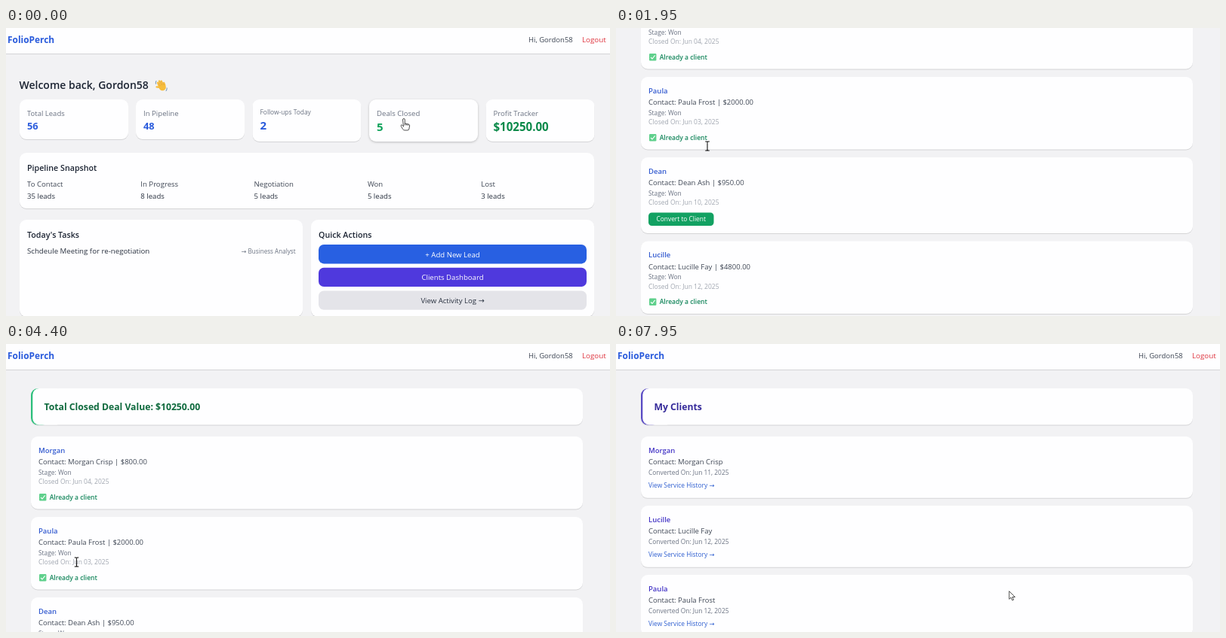
Animation, 800 px wide and 383 px high, one loop 8000 ms. Source, as an HTML page:

```html
<!DOCTYPE html>
<html lang="en">
<head>
<meta charset="utf-8">
<title>CRM dashboard</title>
<style>
  html, body { margin: 0; width: 100%; height: 100%; overflow: hidden; background: #f2f2f4; }
  svg { display: block; width: 100%; height: 100%; font-family: "Open Sans", "Noto Sans", sans-serif; }
  .card { fill: #fefeff; filter: drop-shadow(0 1px .5px rgba(0, 0, 0, .12)); }
  .card.lift { filter: drop-shadow(0 1.8px 1.6px rgba(0, 0, 0, .22)); }
  .arrow { font-family: "DejaVu Sans", sans-serif; }
</style>
</head>
<body>
<svg id="stage" viewBox="0 0 800 383"></svg>
<script>
const INK = '#1c2433', BODY = '#3e4654', DARK = '#2a3240', GRAY = '#6a7282', PALE = '#a0a6b0';
const BLUE = '#2a5bdc', GREEN = '#0b8a4a';
const USER = 'Gordon58';

const text = (x, y, s, size, fill, weight = 400, anchor = 'start') =>
  `<text x="${x}" y="${y}" font-size="${size}" fill="${fill}" font-weight="${weight}" text-anchor="${anchor}">` +
  `${s.replace('→', '<tspan class="arrow">→</tspan>')}</text>`;
const rect = (x, y, w, h, r, attrs) =>
  `<rect x="${x}" y="${y}" width="${w}" height="${h}" rx="${r}" ${attrs}/>`;
const card = (x, y, w, h, attrs = '') => rect(x, y, w, h, 9, `class="card" ${attrs}`);

const header =
  rect(-5, -5, 810, 39, 0, 'class="card"') +
  text(2, 20, 'FolioPerch', 11.9, BLUE, 700) +
  text(692, 19.3, 'Hi, ' + USER, 9.5, BODY) +
  text(763, 19.3, 'Logout', 9.8, '#df3640');

const wave = `<g transform="translate(205.5 77) rotate(-22)" fill="none" stroke="#f6bd3d" stroke-linecap="round">
  <path d="M-2.6 0v-5.6M.1 0v-7M2.7 0v-5.8M-1 2-6-1" stroke-width="2.3"/>
  <path d="M5 1v-3.6" stroke-width="2"/>
  <ellipse cx="1" cy="2.2" rx="4.6" ry="4.6" fill="#f6bd3d" stroke="none"/>
  <path d="M-1.3-1v-4M1.4-1v-5M3.9 0v-3" stroke="#d98e2b" stroke-width=".5"/>
  <path d="M-5.6-5.2q.5-2.2 2-3.2M6 5.5q-.6 2-2.4 3" stroke="#6f93b5" stroke-width="1"/>
</g>`;

// x, height, label, label size, label baseline, value, value size, value baseline, colour
const stats = [
  [18, 53, 'Total Leads', 9.5, 117, '56', 12.8, 134.5, BLUE],
  [172, 53, 'In Pipeline', 9.6, 117, '48', 12.8, 134.5, BLUE],
  [326.5, 56, 'Follow-ups Today', 8.4, 115, '2', 15, 134.5, BLUE],
  [481, 56, 'Deals Closed', 9.6, 117, '5', 15, 136.8, '#10a35c'],
  [635.5, 56, 'Profit Tracker', 9.6, 117, '$10250.00', 15.1, 136.8, GREEN]
].map(([x, h, label, ls, ly, value, vs, vy, color], i) =>
  card(x, 95, 144, h, `id="stat${i}"`) +
  text(x + 10, ly, label, ls, GRAY) +
  text(x + 10, vy, value, vs, color, 700)).join('');

const stages = [['To Contact', 35], ['In Progress', 8], ['Negotiation', 5], ['Won', 5], ['Lost', 3]]
  .map(([name, n], i) =>
    text(28 + i * 150.3, 211, name, 9.6, BODY) +
    text(28 + i * 150.3, 226.5, n + ' leads', 9.6, DARK)).join('');

const buttons = [
  { y: 288, label: '+ Add New Lead', color: '#fff', fill: '#2860e2', hover: '#2150c4' },
  { y: 318.7, label: 'Clients Dashboard', color: '#fff', fill: '#4f39dd', hover: '#432fc6' },
  { y: 349.4, label: 'View Activity Log →', color: DARK, fill: '#e4e4e9', hover: '#d3d5db' }
];
const buttonMarkup = buttons.map((b, i) =>
  rect(414, b.y, 355, 25.4, 7, `id="button${i}" fill="${b.fill}"`) +
  text(591.5, b.y + 16.6, b.label, 9.6, b.color, 400, 'middle')).join('');

const dashboard = header +
  text(17.5, 81, `Welcome back, ${USER}`, 14, INK, 600) + wave + stats +
  card(18, 166, 761, 74) + text(28, 189.5, 'Pipeline Snapshot', 10.7, INK, 600) + stages +
  card(18, 255, 375, 129) + text(28, 278.5, "Today's Tasks", 10.7, INK, 600) +
  text(28, 300, 'Schdeule Meeting for re-negotiation', 9.7, DARK) +
  text(383.5, 299.7, '→ Business Analyst', 8.1, GRAY, 400, 'end') +
  card(404, 255, 375, 129) + text(414, 278.5, 'Quick Actions', 10.7, INK, 600) +
  buttonMarkup;

const banner = (title, edge, color) =>
  card(33, 59, 731, 48.6) +
  rect(33, 59, 24, 48.6, 9, `fill="${edge}"`) +
  rect(35.3, 59, 40, 48.6, 8.5, 'fill="#fefeff"') +
  text(50.5, 88.4, title, 12.2, color, 700);

const clientMark = y =>
  rect(44, y + 76, 9.4, 9.4, 1.2, 'fill="#5fd08c"') +
  `<path d="M46 ${y + 81}l2 2 3.6-4.6" fill="none" stroke="#fff" stroke-width="1.1"/>` +
  text(57.7, y + 83.6, 'Already a client', 8.5, '#12855a', 600);
const convertButton = y =>
  rect(43, y + 73.5, 86.5, 17.5, 4.5, 'id="convert" fill="#12a162"') +
  text(86.2, y + 85.4, 'Convert to Client', 8.4, '#fff', 400, 'middle');

const people = { Morgan: 'Crisp', Paula: 'Frost', Dean: 'Ash', Lucille: 'Fay' };

const deal = (y, name, value, day, isClient) =>
  card(33, y, 731, isClient ? 96.5 : 101) +
  text(43, y + 21.7, name, 9.5, '#355cd0', 600) +
  text(43, y + 37.2, `Contact: ${name} ${people[name]} | $${value}.00`, 9.5, BODY) +
  text(43, y + 50.7, 'Stage: Won', 8.4, GRAY) +
  text(43, y + 63.2, `Closed On: Jun ${day}, 2025`, 8.5, PALE) +
  (isClient ? clientMark(y) : convertButton(y));

const deals = header + banner('Total Closed Deal Value: $10250.00', '#2dbf7c', '#0f6a3e') +
  deal(123, 'Morgan', 800, '04', true) +
  deal(230, 'Paula', 2000, '03', true) +
  deal(337, 'Dean', 950, 10, false) +
  deal(448.5, 'Lucille', 4800, 12, true);

const client = (y, name, day) =>
  card(33, y, 731, 81.8) +
  text(43, y + 21.7, name, 9.5, '#4536c6', 600) +
  text(43, y + 37.2, `Contact: ${name} ${people[name]}`, 9.5, BODY) +
  text(43, y + 50.5, `Converted On: Jun ${day}, 2025`, 8.4, GRAY) +
  text(43, y + 68.4, 'View Service History →', 8.4, '#2f5fd0');

const clients = header + banner('My Clients', '#5a4cc4', '#352a9a') +
  client(123, 'Morgan', 11) + client(215, 'Lucille', 12) + client(307, 'Paula', 12);

const pointers = {
  arrow: '<path d="M0 0v10.6l2.4-2.2 1.7 3.8 1.8-.8-1.7-3.6h3.5z" fill="#fff" stroke="#222" stroke-width=".8"/>',
  hand: `<path d="M-1.5 1q0-1.5 1.4-1.5t1.4 1.5v5l5 1q1.5.4 1.3 2l-.7 4q-.3 2-2 2h-4q-1.5 0-2.3-1.5l-2.4-4q-.5-1.3.5-1.6t2 1.4l.8.8z
    M1.3 6v2.5M3.4 6.5v2M5.4 7v1.8" fill="#fff" stroke="#222" stroke-width=".8"/>`,
  beam: '<path d="M-2.8-6h2L0-5.3.8-6h2M0-5.3V5.3M-2.8 6h2L0 5.3.8 6h2" fill="none" stroke="#111" stroke-width="1.1"/>'
};

const pages = { dashboard, deals, clients };
const group = prefix => ([name, body]) => `<g id="${prefix}${name}">${body}</g>`;
const $ = id => document.getElementById(id);
$('stage').innerHTML =
  rect(0, 0, 800, 383, 0, 'fill="#f2f2f4"') +
  Object.entries(pages).map(group('page-')).join('') +
  `<g id="status">${rect(-5, 373, 84.5, 15, 1.5, 'fill="#2d2d31"')}` +
  '<text id="url" x="-1" y="381.8" font-size="8" fill="#f0f0f0"></text></g>' +
  `<g id="pointer">${Object.entries(pointers).map(group('pointer-')).join('')}</g>`;

const LOOP = 8000, STEP = 50;
const pageTimes = [[0, 'dashboard'], [500, 'deals'], [5700, 'dashboard'], [7750, 'clients']];
const pointerTimes = [
  [0, 'hand'], [550, 'arrow'], [1150, 'beam'], [2150, 'arrow'], [3300, 'hand'], [3650, 'arrow'],
  [4400, 'beam'], [4500, 'arrow'], [5250, 'hand'], [5750, 'arrow'], [6650, 'hand'], [7850, 'arrow']
];
const statusTimes = [
  [0, ''], [100, 'deals/closed/'], [500, ''], [3400, 'convert/3/'], [3700, ''],
  [5400, 'dashboard/'], [6100, ''], [6750, 'clients/'], [7100, 'activity/'], [7450, 'clients/'], [7750, '']
];
const path = [
  [0, 527, 121], [550, 527, 121], [850, 330, 150], [1250, 121, 157], [2150, 121, 157],
  [2550, 107.5, 234], [2900, 112, 150], [3000, 112, 152], [3350, 100, 310], [3600, 92, 316],
  [3750, 95, 355], [4350, 95, 355], [4400, 93.5, 290], [4700, 140, 150], [5100, 45, 24],
  [5300, 42, 16], [5800, 42, 16], [6000, 220, 80], [6050, 250, 111], [6550, 494.5, 314.5],
  [6900, 505, 328], [7200, 545, 354], [7550, 520.8, 328.7], [8000, 520.8, 328.7]
];
const scroll = [
  [0, 0], [1300, 0], [1400, 26.6], [1550, 64], [1950, 165], [2150, 165],
  [2500, 105], [3800, 105], [3950, 50], [4100, 0], [8000, 0]
];

const current = (list, t) => list.filter(([from]) => from <= t).pop()[1];
function along(keys, t) {
  const i = Math.max(1, keys.findIndex(k => k[0] >= t));
  const [t0, ...a] = keys[i - 1], [t1, ...b] = keys[i];
  const u = (t - t0) / (t1 - t0);
  return a.map((v, j) => v + (b[j] - v) * u);
}
function showOnly(prefix, names, chosen) {
  for (const name of names) $(prefix + name).style.display = name === chosen ? '' : 'none';
}

function draw(t) {
  const page = current(pageTimes, t), kind = current(pointerTimes, t), url = current(statusTimes, t);
  const [x, y] = along(path, t), [top] = along(scroll, t);
  showOnly('page-', Object.keys(pages), page);
  showOnly('pointer-', Object.keys(pointers), kind);
  $('page-deals').setAttribute('transform', `translate(0 ${-top})`);
  $('pointer').setAttribute('transform', `translate(${x} ${y})`);
  $('status').style.display = url ? '' : 'none';
  $('url').textContent = '0.1:8000/' + url;

  const over = (left, y0, w, h) => x >= left && x <= left + w && y >= y0 && y <= y0 + h;
  $('stat3').classList.toggle('lift', over(481, 95, 144, 56));
  buttons.forEach((b, i) => $('button' + i).setAttribute('fill', over(414, b.y, 355, 25.4) ? b.hover : b.fill));
  $('convert').setAttribute('fill', over(43, 410.5 - top, 86.5, 17.5) ? '#0d8450' : '#12a162');
}

const start = performance.now();
function tick() {
  const t = (performance.now() - start) % LOOP;
  draw(Math.floor(t / STEP) * STEP);
  requestAnimationFrame(tick);
}
tick();
</script>
</body>
</html>
```
